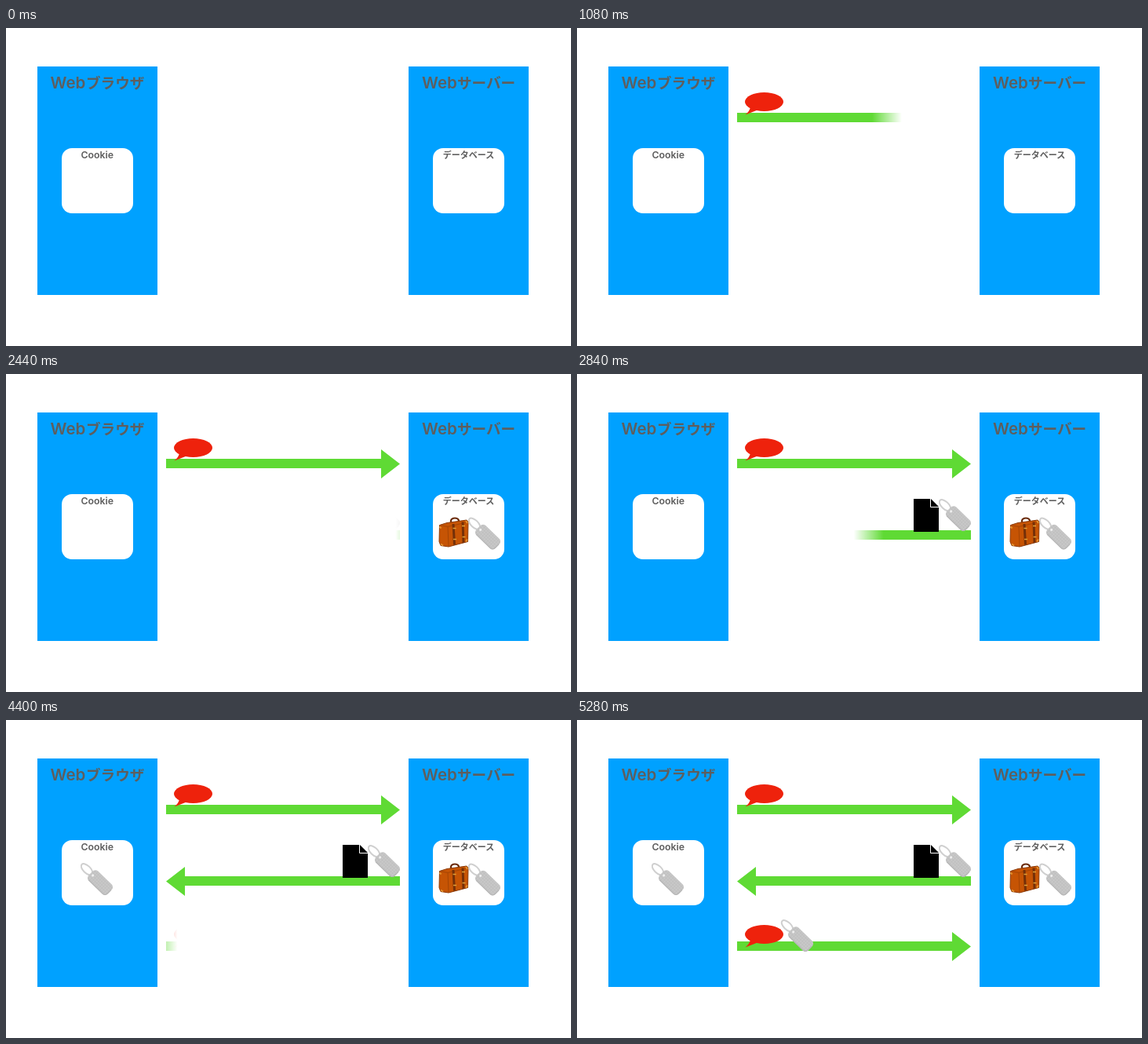
Recreate the animation shown at these times as an HTML page. Size 720x405 px, loop 5800 ms.

```html
<!DOCTYPE html>
<html lang="ja">
<head>
<meta charset="utf-8">
<style>
  html, body { margin: 0; width: 100%; height: 100%; overflow: hidden; background: #fff; }
  svg { display: block; width: 720px; height: 405px; }
  text { font-weight: 600; fill: #5e5e5e; }
  .latin { font-family: Inter, "Liberation Sans", sans-serif; }
  .kana { font-family: "Noto Sans CJK JP", "Noto Sans CJK", sans-serif; font-weight: 700; }
</style>
</head>
<body>
<svg viewBox="0 0 720 405">
  <defs>
    <g id="panel">
      <path d="M0 0h153v291H0z" fill="#00a1ff"/>
      <rect x="31" y="104" width="91" height="83" rx="13" fill="#fff"/>
    </g>
    <path id="arrow" d="M204 108H478V96L502 114.5 478 133V120H204z" fill="#5fda34"/>
    <g id="bubble" fill="#ee220c">
      <ellipse cx="238.5" cy="94" rx="24.5" ry="12"/>
      <path d="M221 101Q220 106 214.5 110.5L230 104.5z"/>
    </g>
    <pattern id="weave" width="3" height="3" patternUnits="userSpaceOnUse">
      <path d="M0 0h3v3H0z" fill="#c9c9c9"/>
      <path d="M0 .5H3M.5 0V3" stroke="#bdbdbd" stroke-width=".7"/>
    </pattern>
    <g id="tag">
      <ellipse cx="8" cy="7.2" rx="9" ry="4.6" transform="rotate(44 8 7.2)" fill="none" stroke="#cfcfcf" stroke-width="2"/>
      <g transform="translate(25 24) rotate(44)">
        <rect x="-17" y="-8.5" width="34" height="17" rx="5" fill="url(#weave)"/>
        <path d="M-13 8H12Q16.5 8 16.5 3V-3" fill="none" stroke="#b4b4b4"/>
        <circle cx="-13" cy="0" r="1.6" fill="#eee"/>
      </g>
    </g>
    <g id="suitcase" stroke-linejoin="round">
      <path d="M16 9V4Q17 1 21 1T26 4V7" fill="none" stroke="#6b2c0c" stroke-width="2.2"/>
      <path d="M1.5 10L11 7 36 3.5 38 6 37.5 31 13 37.5 3 36 1 31z" fill="#c65404" stroke="#8a3907"/>
      <path d="M1.5 10L12 12 38 6M12 12L13 37" fill="none" stroke="#a54505"/>
      <path d="M19 8.5L20.5 35M31 6L32 32.5" stroke="#743009" stroke-width="3"/>
      <path d="M18.5 14h4M19 28h4M30 11h4M30.5 25h4" stroke="#dfa03a" stroke-width="1.6"/>
      <path d="M1.5 12l2 2M3 34l3 2M35 4.5l2 3M35 31l2-3" stroke="#e4932f" stroke-width="2"/>
    </g>
  </defs>

  <use href="#panel" x="40" y="49"/>
  <use href="#panel" x="513" y="49"/>
  <g font-size="20.5">
    <text class="latin" x="56.5" y="77">Web</text>
    <text class="latin" x="530" y="77">Web</text>
  </g>
  <g font-size="18.6">
    <text class="kana" x="102" y="77">ブラウザ</text>
    <text class="kana" x="575" y="77">サーバー</text>
  </g>
  <text class="latin" x="116.3" y="165.5" font-size="12.3" text-anchor="middle">Cookie</text>
  <text class="kana" x="589.5" y="165.5" font-size="11" text-anchor="middle">データベース</text>

  <g class="wipe">
    <use href="#arrow"/>
    <use href="#bubble"/>
  </g>
  <g class="pop">
    <use href="#suitcase" x="551" y="182.5"/>
    <use href="#tag" x="589" y="183.5"/>
  </g>
  <g class="wipe">
    <use href="#arrow" transform="translate(706 91) scale(-1 1)"/>
    <path d="M429 159H451L461 169V201H429z"/>
    <path d="M450.5 159V169.5H461" fill="none" stroke="#fff"/>
    <use href="#tag" x="461" y="160"/>
  </g>
  <g class="pop"><use href="#tag" x="95" y="183"/></g>
  <g class="wipe">
    <use href="#arrow" y="174"/>
    <use href="#bubble" y="179"/>
    <use href="#tag" x="260" y="255"/>
  </g>
</svg>
<script>
const LOOP = 5800, STEP = 40, LEFT = 204, RIGHT = 502, SOFT = 38;
const wipes = [
  { start: 480, end: 1440, dir: 1 },
  { start: 2424, end: 3360, dir: -1 },
  { start: 4360, end: 5280, dir: 1 }
];
const popTimes = [1960, 3880];
const pops = document.querySelectorAll('.pop');
const defs = document.querySelector('defs');

// One soft-edged mask per wipe
wipes.forEach((w, i) => {
  defs.insertAdjacentHTML('beforeend', `
    <linearGradient id="edge${i}" gradientUnits="userSpaceOnUse" y1="0" y2="0">
      <stop offset="0" stop-color="#fff"/><stop offset="1" stop-color="#fff" stop-opacity="0"/>
    </linearGradient>
    <mask id="mask${i}" maskUnits="userSpaceOnUse" x="0" y="0" width="720" height="405">
      <rect width="720" height="405" fill="url(#edge${i})"/>
    </mask>`);
  w.edge = document.getElementById('edge' + i);
  w.group = document.querySelectorAll('.wipe')[i];
});

function draw(time) {
  const t = Math.floor(time % LOOP / STEP) * STEP;
  wipes.forEach(({ start, end, dir, edge, group }, i) => {
    const p = (t - start) / (end - start);
    const front = (dir > 0 ? LEFT : RIGHT) + dir * p * (RIGHT - LEFT + SOFT);
    edge.setAttribute('x1', front - dir * SOFT);
    edge.setAttribute('x2', front);
    group.style.display = p > 0 ? '' : 'none';
    group.style.mask = p < 1 ? `url(#mask${i})` : 'none';
  });
  pops.forEach((g, i) => g.style.display = t >= popTimes[i] ? '' : 'none');
}

const begin = performance.now();
function tick() {
  draw(performance.now() - begin);
  requestAnimationFrame(tick);
}
tick();
</script>
</body>
</html>
```
